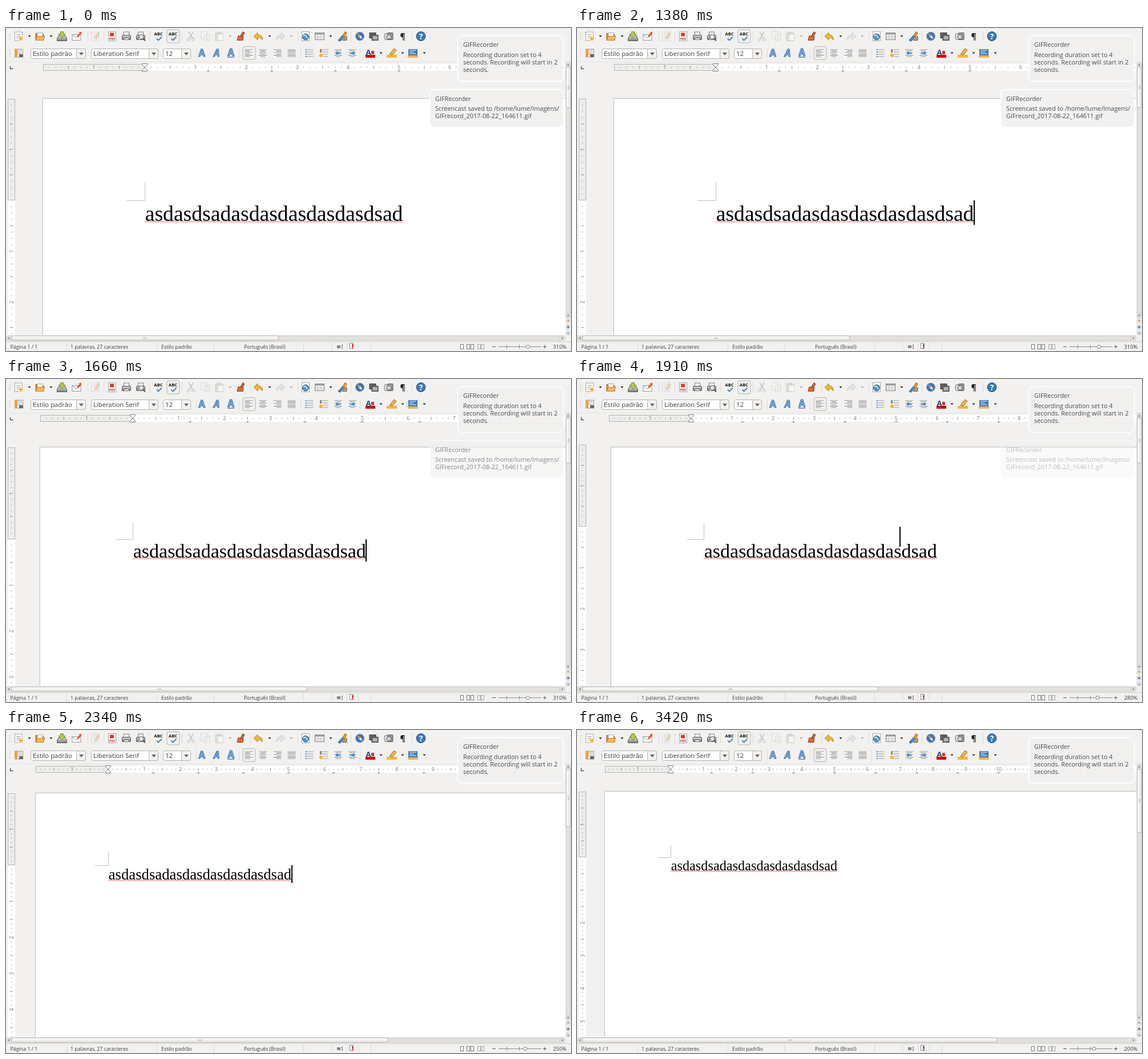
These frames come from a looping animation (990x566 px, 3800 ms). An HTML page:

```html
<!DOCTYPE html>
<html lang="pt-BR">
<head>
<meta charset="utf-8">
<title>Editor de texto</title>
<style>
html, body { margin: 0; width: 100%; height: 100%; overflow: hidden; background: #f2f1f0; }
svg { display: block; width: 990px; height: 566px; }
text { font-family: "Open Sans", "Noto Sans", sans-serif; font-size: 11px; fill: #3c3c3c; white-space: pre; }
.status text { font-size: 8.85px; }
.combo text { font-size: 11.3px; }
.ruler text { font-size: 9px; fill: #777; text-anchor: middle; }
.note text { font-size: 10.9px; fill: #4a4a4a; }
.doc { font-family: "Liberation Serif", serif; fill: #000; }
.abc { font-size: 7.5px; font-weight: 700; fill: #111; text-anchor: middle; }
.big { font-size: 17px; font-weight: 700; text-anchor: middle; fill: #8bb8e6; stroke: #2f66a8; stroke-width: .9; }
.off { opacity: .35; }
</style>
</head>
<body>
<svg id="stage" viewBox="0 0 990 566" xmlns="http://www.w3.org/2000/svg">
  <defs>
    <clipPath id="work"><rect y="60" width="980" height="478"/></clipPath>
    <linearGradient id="thumbH" x2="0" y2="1"><stop stop-color="#fff"/><stop offset="1" stop-color="#e4e2df"/></linearGradient>
    <linearGradient id="thumbV"><stop stop-color="#fff"/><stop offset="1" stop-color="#e4e2df"/></linearGradient>
    <linearGradient id="metal" x2="0" y2="1"><stop stop-color="#d8d8d5"/><stop offset="1" stop-color="#7d7f7a"/></linearGradient>
  </defs>
  <rect width="990" height="566" fill="#f2f1f0"/>
  <g id="pages" clip-path="url(#work)"></g>
  <g id="rulers" class="ruler" clip-path="url(#work)"></g>
  <g id="carets"></g>
  <g id="chrome"></g>
  <g id="bars"></g>
  <g id="labels" class="status"></g>
  <g id="notes" class="note"></g>
</svg>
<script>
const LOOP = 3800;
const ZOOMS = [310, 280, 250, 220, 200];
const RULER_AT = [1620, 1910, 2300, 2840];
const PAGE_AT = [1660, 1950, 2340, 2880];
const LABEL_AT = [1910, 2160, 2590, 3140];
const WORD = 'asdasdsadasdasdasdasdasdsad';
const $ = id => document.getElementById(id);

const rect = (x, y, w, h, fill, more = '') =>
  `<rect x="${x}" y="${y}" width="${w}" height="${h}" fill="${fill}" ${more}/>`;
const path = (d, fill = 'none', stroke = 'none', width = 1) =>
  `<path d="${d}" fill="${fill}" stroke="${stroke}" stroke-width="${width}"/>`;
const disc = (x, y, r, fill, stroke = 'none') =>
  `<circle cx="${x}" cy="${y}" r="${r}" fill="${fill}" stroke="${stroke}"/>`;
const text = (x, y, s, more = '') => `<text x="${x}" y="${y}" ${more}>${s}</text>`;
const put = (x, y, s, cls = '') => `<g transform="translate(${x} ${y})" class="${cls}">${s}</g>`;

// Page geometry for one zoom level
function layout(z) {
  const unit = z * .2874, left = Math.round(47.8 + (z - 200) * .145);
  const top = Math.round(106.9 + (z - 200) * .145), size = z * .1215;
  return { z, unit, left, top, size, width: size * 12,
    x: Math.round(164.3 + (z - 200) * .718), y: Math.round(top + 1 + 2 * unit) };
}

function page({ z, left, top, x, y, size, width }) {
  const c = Math.round(z * .103), base = Math.round(y + size * .95);
  let wave = `M${x} ${base + 2.5}`;
  for (let i = 0; i < width - 2; i += 4) wave += 'l2-2 2 2';
  return rect(left - 1, top - 1, 1000, 500, '#e6e5e4') + rect(left, top, 1000, 500, '#c6c5c3') +
    rect(left + 1, top + 1, 1000, 500, '#fff') +
    path(`M${x - c} ${y + .5}H${x + .5}V${y - c}`, 'none', '#c0c0c0') +
    path(wave, 'none', '#e33', .9) +
    text(x + .7, base, WORD, `class="doc" style="font-size:${size}px"`);
}

// Ticks run along the local x axis; dir -1 serves the turned ruler
function ticks(origin, unit, end, dir) {
  let d = '', s = '';
  for (let i = -15; origin + i * unit / 8 < end; i++) {
    const p = dir * (origin + i * unit / 8);
    if (i % 8 === 0) { if (i) s += text(p, 3.4, Math.abs(i / 8)); }
    else d += i % 4 ? `M${p} -.8v1.6` : `M${p} -2.5v5`;
  }
  return path(d, 'none', '#8a8a8a') + s;
}

function ruler({ unit, left, top, x, y }) {
  let tabs = '';
  for (let p = x + 1.25 * unit; p < 980; p += 1.25 * unit) tabs += `M${p - 2.5} 75.5h5m-2.5 0v-2.5`;
  const hour = s => path(`M${x - 4.5} ${69 - 6.5 * s}h9v${2 * s}l-4.5 ${4.5 * s}l-4.5 ${-4.5 * s}z`, '#fbfbfb', '#777');
  return rect(x, 63, 980 - x, 12, '#fff') +
    rect(left + 1.5, 63.5, x - left - 2, 11, '#eeedec', 'stroke="#b5b3b0"') +
    rect(3, y, 13, 538 - y, '#fff') +
    rect(3.5, top + 1.5, 12, y - top - 2, '#eeedec', 'stroke="#b5b3b0"') +
    put(0, 69, ticks(x, unit, 980, 1)) +
    `<g transform="translate(9.5 0) rotate(-90)">${ticks(y, unit, 538, -1)}</g>` +
    path(tabs, 'none', '#8a8a8a') + hour(1) + hour(-1);
}

const caret = ({ z, x, y, size, width }) =>
  rect(Math.round(x + width), y, z > 210 ? 2 : 1, Math.round(size * 1.149), '#000');

function bars({ z }) {
  const w = 145500 / z, h = 22400 / z, gx = 9 + w / 2, gy = 68 + h / 2;
  return rect(9.5, 539.5, w - 1, 8, 'url(#thumbH)', 'rx="3" stroke="#b3b0ac"') +
    path(`M${gx - 2.5} 542v3m2.5-3v3m2.5-3v3`, 'none', '#aaa') +
    rect(981.5, 68.5, 8, h - 1, 'url(#thumbV)', 'rx="3" stroke="#b3b0ac"') +
    path(`M984 ${gy - 2.5}h3m-3 2.5h3m-3 2.5h3`, 'none', '#aaa');
}

const label = ({ z }) => disc(906 + (z - 200) * .077, 558.5, 3, '#fff', '#777') +
  text(958.5, 561.5, z + '%', 'style="font-size:9.3px"');

// Icons are drawn around 0,0
const sheet = (w = 13, h = 15) => rect(-w / 2, -h / 2, w, h, '#fdfdfd', 'stroke="#a3a5a0"');
const lines = (n, w, step = 3) => {
  let d = '';
  for (let i = 0; i < n; i++) d += `M${-w / 2} ${(i - (n - 1) / 2) * step}h${w}`;
  return path(d, 'none', '#999', 1);
};
const align = k => {
  let d = '';
  for (let i = 0; i < 6; i++) {
    const w = i % 2 && k < 3 ? 9 : 14;
    d += `M${k === 0 ? -7 : k === 2 ? 7 - w : -w / 2} ${i * 2.4 - 6}h${w}`;
  }
  return rect(-7.5, -7, 15, 14, '#fafaf9') + path(d, 'none', '#8c8c8c', 1.1);
};
const pressed = rect(-10.5, -11.5, 22, 23, '#f0efed', 'rx="3" stroke="#b9b5b0"');
const drop = path('M-2.5-1.5h5L0 1.7z', '#333');
const check = path('M-3 4l3 3 6-6', 'none', '#4b83bd', 2);
const spell = text(0, -1.5, 'ABC', 'class="abc"') + check;
const printer = rect(-4.5, -7.5, 9, 6, '#fff', 'stroke="#777"') +
  rect(-7.5, -2, 15, 8, 'url(#metal)', 'rx="1.5" stroke="#555"') + rect(-4.5, 3, 9, 3, '#f4f4f4', 'stroke="#666"');
const arrowBack = path('M-8 0l7-6.5v4c6 0 9 3 8 9-2-3.5-4-4.5-8-4v4z', '#f3b83e', '#b67a14');
const folder = path('M-8-5h6l1 2h7v10h-14z', '#e08a2c', '#a85f14') +
  rect(-5, -6, 9, 6, '#fdfdfd', 'stroke="#aaa"') + path('M-8 7l3-7h13l-3 7z', '#fbb75a', '#c98133');
const indent = s => align(1) + path(`M${5 * s}-1.5h${-5 * s}v-2.5l${-6 * s} 4 ${6 * s} 4v-2.5h${5 * s}z`, '#3f7ec4', '#fff', .7);
const letter = more => text(0, 6, 'A', `class="big" ${more}`);
const pen = path('M0 3L6-7 8-5 3 4z', '#f0b040', '#8a5a10');

function icons() {
  const top = [
    [22, sheet() + lines(3, 7) + disc(4, 4, 4, '#f4b73f', '#fff')],
    [60, folder],
    [98, path('M-6-1h12l2.5 5v4h-17v-4z', 'url(#metal)', '#555') + path('M-2.5-8h5v4h3.5L0 3l-6-7h3.5z', '#b5cc4e', '#72882a')],
    [124, rect(-8, -3, 15, 10, '#fcfcfb', 'stroke="#999"') + path('M-8-3l7 6 8-6', 'none', '#999') + path('M0 0l5-6-2-1 5-1v5l-1-1-5 6z', '#e8552d')],
    [156, sheet() + lines(4, 8) + pen, 'off'],
    [186, sheet(13, 16) + rect(-4, -6, 7, 6, '#d33b30') + text(0, 6.5, 'PDF', 'style="font-size:5.5px;font-weight:700;text-anchor:middle;fill:#c22"')],
    [211, printer],
    [236, printer + disc(1, 1, 4, '#e3edf4', '#555') + path('M4 4l4 4', 'none', '#555', 2)],
    [267, spell],
    [292.5, pressed + spell],
    [324, path('M-4-8L3 4M4-8L-3 4', 'none', '#777', 1.6) + disc(-4, 5.5, 2.4, 'none', '#666') + disc(4, 5.5, 2.4, 'none', '#666'), 'off'],
    [349, put(-2, -2, sheet(10, 12)) + put(3, 2, sheet(9, 11) + lines(3, 5)), 'off'],
    [374, rect(-7, -6, 13, 14, '#c9b99b', 'rx="1" stroke="#888"') + rect(-3, -8, 5, 4, '#999') + put(2, 2, sheet(10, 11)), 'off'],
    [412, path('M3-8l3 2-4 7-3-2z', '#c2683c', '#7e3418') + path('M-5-1l9 2-1 6h-10z', '#dd6a3c', '#963412')],
    [442, arrowBack],
    [481, '<g transform="scale(-1 1)">' + arrowBack.replace('#f3b83e', '#ccc').replace('#b67a14', '#888') + '</g>', 'off'],
    [525, sheet(13, 16) + disc(0, 1, 5.5, '#4c8fd0', '#285a8e') + path('M-4 0q3-4 5 0t3 2', 'none', '#cfe5c0', 1.8)],
    [549, rect(-7.5, -6, 16, 12, '#fff', 'stroke="#777"') + rect(-7.5, -6, 16, 3, '#999') + path('M-7 0H8M-7 3H8M-2.5-6V6M3-6V6', 'none', '#bbb')],
    [589, path('M-7 7l8-9 3 3-8 8z', '#4b88c7', '#285480') + path('M1-1L5-8l3 2-4 8z', '#e5a33c', '#875816') + path('M0 7h8V0z', '#c4a16d', '#76552a')],
    [620, disc(0, 0, 7.5, '#3d74b4', '#9a9a98') + path('M-4-5l6 4 2 6-6-4z', '#fff') + path('M-4-5l6 4-4 2z', '#d98a36')],
    [644, rect(-7, -6, 11, 9, '#666', 'stroke="#333"') + rect(-3, -2, 11, 9, '#888', 'stroke="#333"') + rect(-1, 0, 7, 5, '#b5b5b5')],
    [670, rect(-7, -5, 8, 11, '#ddd', 'rx="3" stroke="#777"') + rect(-1, -6, 9, 12, '#999', 'rx="1" stroke="#555"') + disc(1, 1, 4, '#cfd5d8', '#555')],
    [695, text(0, 5, '¶', 'style="font-size:14px;font-weight:700;text-anchor:middle;fill:#222"')],
    [727, disc(0, 0, 8, '#3b78b9', '#245180') + text(0, 5, '?', 'style="font-size:14px;font-weight:700;text-anchor:middle;fill:#fff"')]
  ];
  const second = [
    [22, rect(-6.5, -7, 14, 14, '#fff', 'stroke="#999"') + rect(-7, -7, 5, 14, '#e9a14a') + put(2, -2, lines(3, 8)) + rect(1, 2, 7, 5, '#666')],
    [343, letter('')],
    [369, letter('font-style="italic"')],
    [394, put(0, -1, letter('')) + rect(-6, 6.5, 12, 1.2, '#2f66a8')],
    [425.5, pressed + align(0)], [450, align(1)], [475.5, align(2)], [500.5, align(3)],
    [531.5, put(2, 0, lines(4, 10, 4)) + path('M-7-6h3m-3 4h3m-3 4h3m-3 4h3', 'none', '#3f7ec4', 1.6)],
    [557, put(2, 0, lines(4, 11, 4)) + disc(-5, 4, 4, '#f1b43c', '#fff') + rect(-7, -7, 3, 6, '#888')],
    [582, indent(1)], [607, indent(-1)],
    [638, rect(-8, 3, 17, 5, '#c00') + text(-3, 3, 'A', 'style="font-size:13px;font-weight:700;text-anchor:middle;fill:#26427a"') + rect(2, -4, 5, 6, '#c33', 'rx="1"')],
    [676, rect(-9, 3, 18, 5, '#f5b63c') + path('M-4 2l8-10 4 3-7 8z', '#f0b652', '#8f6523')],
    [713, rect(-8, -7, 16, 11, '#3d76b8') + path('M-6-5H6M-6-2H2M-6 1H6', 'none', '#fff') + rect(-9, 4, 18, 4, '#f0b445')]
  ];
  return top.map(([x, s, c]) => put(x, 14.5, s, c)).join('') +
    second.map(([x, s]) => put(x, 44, s)).join('') +
    [41, 79, 462, 569].map(x => put(x, 14.5, drop)).join('') +
    [393, 500].map(x => put(x, 14.5, drop, 'off')).join('') +
    [657, 695, 733].map(x => put(x, 44, drop)).join('');
}

const combo = (x, w, s) => rect(x + .5, 36.5, w - 1, 17, '#fff', 'rx="3" stroke="#b5b1ac"') +
  rect(x + w - 16.5, 36.5, 16, 17, '#f3f2f0', 'rx="3" stroke="#b5b1ac"') +
  put(x + w - 8, 45, path('M-4-2h8L0 3z', '#666')) + text(x + 4, 49, s);

const rules = (xs, y, h) => path(xs.map(x => `M${x}.5 ${y}v${h}`).join(''), 'none', '#dcdad7');
const tri = (x, y, a) => `<path d="M-2 1.2h4L0-1.7z" fill="#777" transform="translate(${x} ${y}) rotate(${a})"/>`;

function chrome() {
  const grip = y => path(`M6.5 ${y}v12`, 'none', '#c5c2be', 1.5).replace('/>', ' stroke-dasharray="1.5 2"/>');
  return grip(9) + grip(38) +
    rules([143, 171, 251, 308, 428, 511, 604, 711], 6, 17) + rules([333, 408, 516, 620], 36, 17) +
    icons() +
    `<g class="combo">${combo(43, 97, 'Estilo padrão') + combo(149, 118, 'Liberation Serif') + combo(275, 49, '12')}</g>` +
    path('M0 59.5H990', 'none', '#e5e3e1') + path('M7.5 67v4.5h5', 'none', '#555', 1.5) +
    rect(0, 538, 990, 28, '#f2f1f0') + rect(980, 60, 10, 479, '#f2f1f0') +
    rect(.5, 539.5, 979, 8, '#e3e1de', 'rx="2" stroke="#cfccc8"') + rect(981.5, 60.5, 8, 448, '#e3e1de', 'rx="2" stroke="#cfccc8"') +
    tri(5, 543.5, -90) + tri(975, 543.5, 90) + tri(985, 64.5, 0) + tri(985, 504, 180) +
    path('M9.5 539v9M970.5 539v9M981 68.5h9M981 499.5h9', 'none', '#cfccc8') +
    [514, 524, 534].map(y => disc(985, y, 3.6, '#f8f8f7', '#c4c1bd')).join('') +
    tri(985, 513, 0) + disc(985, 524, 2, '#3f78b8') + tri(985, 535, 180) +
    path('M0 549.5H990', 'none', '#cfccc8') +
    rules([106, 264, 364, 521, 570, 597, 617, 639], 551, 14) +
    `<g class="status">${text(7.5, 561.5, 'Página 1 / 1') + text(113, 561.5, '1 palavras, 27 caracteres') +
      text(272, 561.5, 'Estilo padrão') + text(417, 561.5, 'Português (Brasil)')}</g>` +
    rect(580, 556, 6, 5, '#888') + path('M588 555.5h2m-1 0v6m-1 0h2', 'none', '#666') +
    rect(602.5, 552.5, 6, 9, '#fff', 'stroke="#8a8aa0"') + rect(606, 554, 2, 5, '#d0303a') + rect(606, 560, 2, 2, '#d0303a') +
    [796, 807, 814, 826, 832].map(x => rect(x + .5, 554.5, 5, 8, x > 820 ? '#ececea' : '#fff', `stroke="${x > 820 ? '#aaa' : '#777'}"`)).join('') +
    path('M852 558.5h6M941 558.5h6m-3-3v6', 'none', '#555') +
    path('M863 558.5h75M877.5 555v7M899.5 555v7', 'none', '#8d8b88');
}

const note = (x, y, w, h, rows) => rect(x, y, w, h, '#f2f1f0', 'rx="8" fill-opacity=".95" stroke="#fff" stroke-opacity=".85" stroke-width="2"') +
  text(x + 9.5, y + 19.5, 'GIFRecorder') + rows.map((s, i) => text(x + 9.5, y + 37 + i * 13, s)).join('');

const levels = ZOOMS.map(layout);
const build = (id, draw) => {
  $(id).innerHTML = levels.map(l => `<g>${draw(l)}</g>`).join('');
  return [...$(id).children];
};
const layers = [
  [build('pages', page), PAGE_AT], [build('bars', bars), PAGE_AT],
  [build('rulers', ruler), RULER_AT], [build('carets', caret), RULER_AT],
  [build('labels', label), LABEL_AT]
];
$('chrome').innerHTML = chrome();
$('notes').innerHTML =
  note(791.5, 13.5, 185, 80, ['Recording duration set to 4', 'seconds. Recording will start in 2', 'seconds.']) +
  `<g id="saved">${note(742.5, 108, 234, 66, ['Screencast saved to /home/lume/Imagens/', 'GIFrecord_2017-08-22_164611.gif'])}</g>`;

function frame() {
  const t = performance.now() % LOOP;
  for (const [groups, times] of layers) {
    const now = times.filter(at => t >= at).length;
    groups.forEach((g, i) => { g.style.display = i === now ? '' : 'none'; });
  }
  const lit = (t >= 190 && t < 790) || (t >= 1380 && t < 3420);
  $('carets').style.display = lit ? '' : 'none';
  $('saved').style.opacity = Math.max(0, Math.min(1, 1 - (t - 1380) / 820));
  requestAnimationFrame(frame);
}
frame();
</script>
</body>
</html>
```
